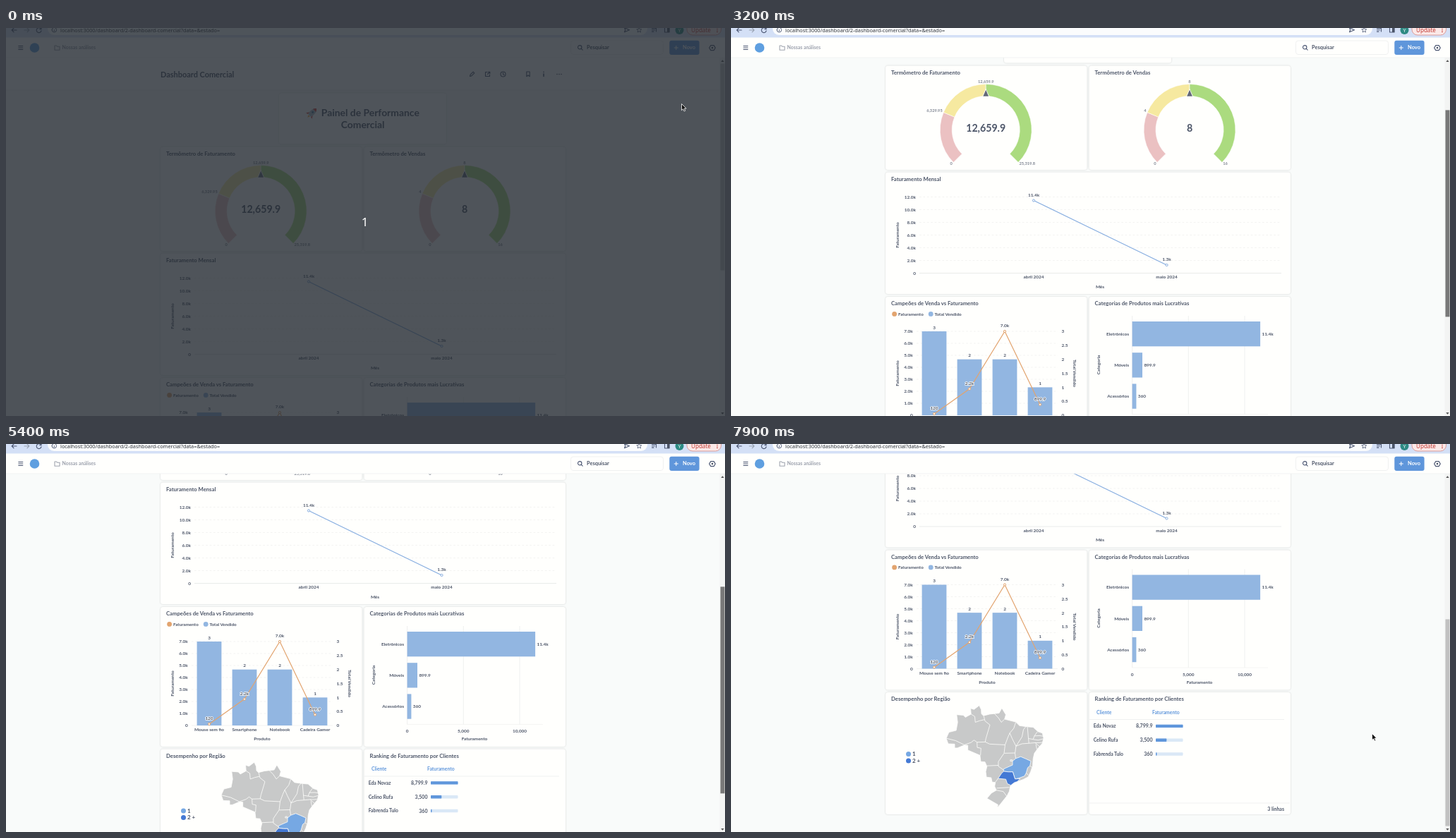
These frames come from a looping animation (1019x550 px, 8 s). An HTML page:

```html
<!DOCTYPE html>
<html lang="pt-BR">
<head>
<meta charset="utf-8">
<title>Dashboard Comercial</title>
<style>
@property --s { syntax: "<number>"; inherits: true; initial-value: 0; }
html, body { margin: 0; width: 100%; height: 100%; overflow: hidden; background: #f9fbfa; }
svg { display: block; width: 1019px; height: 550px; font: 700 6.45px Lato, sans-serif; animation: scroll 8s infinite; }
#board { transform: translateY(calc(var(--s) * -1px)); }
#thumb { transform: translateY(calc(var(--s) * .573px)); animation: thumb 8s step-end infinite; }
#dim { animation: dim 8s step-end infinite; }
#cursor { animation: cursor 8s infinite; }
.card { fill: #fffffd; filter: drop-shadow(0 .5px 1px #0000002a); }
.ui { font-family: "Noto Sans", sans-serif; font-weight: 400; }
.halo { paint-order: stroke; stroke: #fffffd; stroke-width: 1.6px; stroke-linejoin: round; }
.icon { fill: none; stroke: #4c5773; stroke-width: 1.1; stroke-linejoin: round; stroke-linecap: round; }
.map path { vector-effect: non-scaling-stroke; stroke: #fffffd; stroke-width: .8px; stroke-linejoin: round; }

@keyframes scroll {
  0% { --s: 0; }
  26.25% { --s: 0; animation-timing-function: steps(3); }
  30% { --s: 24.5; animation-timing-function: steps(8); }
  40% { --s: 115; animation-timing-function: steps(7); }
  48.75% { --s: 190; animation-timing-function: steps(2); }
  51.25% { --s: 206; }
  52.5% { --s: 206; animation-timing-function: steps(4); }
  57.5% { --s: 228; }
  60% { --s: 228; animation-timing-function: steps(1); }
  61.25% { --s: 232; animation-timing-function: steps(1); }
  63.75% { --s: 238; animation-timing-function: steps(3); }
  67.5% { --s: 265; animation-timing-function: steps(7); }
  76.25% { --s: 331.5; animation-timing-function: steps(2); }
  78.75% { --s: 343; animation-timing-function: steps(1); }
  81.25%, 100% { --s: 345.5; }
}
@keyframes thumb {
  0% { fill: #c1c1c1; }
  15% { fill: #a8a8a8; }
  25% { fill: #787878; }
  88.75% { fill: #a8a8a8; }
  92.5%, 100% { fill: #c1c1c1; }
}
@keyframes dim {
  0% { opacity: 1; }
  2.5%, 100% { opacity: 0; }
}
@keyframes cursor {
  0% { transform: translate(957px, 107px); }
  6.25% { transform: translate(957px, 107px); animation-timing-function: steps(5); }
  12.5% { transform: translate(1017px, 95px); animation-timing-function: steps(1); }
  18.75% { transform: translate(1016px, 95px); }
  26.25% { transform: translate(1016px, 95px); animation-timing-function: steps(3); }
  30% { transform: translate(1016px, 109px); animation-timing-function: steps(5); }
  36.25% { transform: translate(1021px, 136px); animation-timing-function: steps(1); }
  91.25% { transform: translate(1022px, 316px); animation-timing-function: steps(4); }
  96.25% { transform: translate(946px, 379px); animation-timing-function: steps(1); }
  98.75%, 100% { transform: translate(908px, 410px); }
}
</style>
</head>
<body>
<svg id="stage" viewBox="0 0 1019 550"></svg>
<script>
const INK = '#4c5568', BLUE = '#92b6e1', ORANGE = '#e2a46f', BRAND = '#5f96db', GRID = '#eeeeec';
const range = n => [...Array(n).keys()];
const each = (list, fn) => list.map(fn).join('');

// Text placed by the vertical centre of its capitals.
const text = (x, y, s, o = {}) => {
  const { size = 6.45, at = 'middle', fill = INK, cls = '', turn = 0 } = o;
  const spin = turn ? ` transform="rotate(${turn} ${x} ${y})"` : '';
  return `<text x="${x}" y="${y + size * .36}" font-size="${size}px" text-anchor="${at}" fill="${fill}" class="${cls}"${spin}>${s}</text>`;
};
const rect = (x, y, w, h, fill, more = '') => `<rect x="${x}" y="${y}" width="${w}" height="${h}" fill="${fill}" ${more}/>`;
const dot = (x, y, r, fill, more = '') => `<circle cx="${x}" cy="${y}" r="${r}" fill="${fill}" ${more}/>`;
const path = (d, more = '') => `<path d="${d}" ${more}/>`;
const line = (d, color, w = .6, more = '') => path(d, `fill="none" stroke="${color}" stroke-width="${w}" ${more}`);
const icon = (d, more = '') => path(d, `class="icon" ${more}`);
const card = (x, y, w, h, title = '') =>
  `<rect class="card" x="${x}" y="${y}" width="${w}" height="${h}" rx="3.5"/>` + text(x + 8, y + 9.5, title, { size: 7.7, at: 'start' });
const ring = (x, y, color) => dot(x, y, 1.6, '#fffffd', `stroke="${color}" stroke-width="1"`);
const dash = 'stroke-dasharray="2.7 2.7"';

function gauge(cx, labels) {
  const cy = 259.5, R = 65, r = 48;
  const pt = (k, rad) => {
    const a = (135 + 270 * k) * Math.PI / 180;
    return `${(cx + rad * Math.cos(a)).toFixed(2)} ${(cy + rad * Math.sin(a)).toFixed(2)}`;
  };
  const seg = (a, b, fill) => path(
    `M${pt(a, R)}A${R} ${R} 0 0 1 ${pt(b, R)}L${pt(b, r)}A${r} ${r} 0 0 0 ${pt(a, r)}Z`,
    `fill="${fill}" stroke="#fffffd" stroke-width=".6"`);
  const small = (x, y, s, at) => text(x, y, s, { size: 5.7, at, fill: '#7d8390', cls: 'halo' });
  return seg(0, .25, '#ebc1c2') + seg(.25, .5, '#f6e9a0') + seg(.5, 1, '#abdb7f')
    + path(`M${cx} 202.8l3.9 8.9h-7.8z`, 'fill="#626878" stroke="#fffffd" stroke-width="1.6" paint-order="stroke"')
    + small(cx, 190.7, labels[2], 'middle') + small(cx - 61.5, 232, labels[1], 'end')
    + small(cx - 49, 306.7, labels[0], 'middle') + small(cx + 47.3, 306.7, labels[3], 'start')
    + text(cx, 257.3, labels[2], { size: 14.2 });
}

function heading() {
  const rocket = '<g transform="translate(434 120) rotate(45)">'
    + path('M-3 2l-3 4.5 3-.8zM3 2l3 4.5-3-.8z', 'fill="#d8433f"')
    + path('M0-8.5c4 3 4.5 9 2.5 14h-5c-2-5-1.5-11 2.5-14z', 'fill="#a9b8c4"')
    + path('M0-8.5c1.6 1.2 2.5 2.6 3 4.1h-6c.5-1.5 1.4-2.9 3-4.1z', 'fill="#d8433f"')
    + dot(0, -1, 1.5, '#3d6f96') + path('M-1.5 6h3l-1.5 3.5z', 'fill="#f2a53a"') + '</g>';
  return card(387, 92.5, 237, 72) + rocket
    + text(516.3, 120, 'Painel de Performance', { size: 13.9 }) + text(505.7, 137, 'Comercial', { size: 13.9 });
}

function monthly() {
  const pts = [[429, 359.5, '11.4k', 'abril 2024'], [617.5, 451, '1.3k', 'maio 2024']];
  return card(219, 319.5, 574, 172.5, 'Faturamento Mensal')
    + each(range(7), i => {
      const y = 462.5 - 18 * i;
      return line(`M267 ${y}H780`, i ? GRID : '#e0e2e2', .7, i ? dash : '')
        + text(262, y, i ? `${2 * i}.0k` : '0', { at: 'end' });
    })
    + line('M429 359.5L617.5 451', '#86ade0', 1.2)
    + each(pts, ([x, y, v, m]) => ring(x, y, '#86ade0') + text(x, y - 8, v, { cls: 'halo' }) + text(x, 468, m))
    + text(523, 481.3, 'Mês') + text(235.5, 408.5, 'Faturamento', { turn: -90 });
}

function combo() {
  const items = [['Mouse sem fio', 3, 120, '120'], ['Smartphone', 2, 2200, '2.2k'], ['Notebook', 2, 7000, '7.0k'], ['Cadeira Gamer', 1, 899.9, '899.9']];
  const X = i => 288 + 50 * i, Y = v => 664 - v * .017;
  return card(219, 496, 285.5, 198, 'Campeões de Venda vs Faturamento')
    + dot(231.6, 520.4, 3.4, ORANGE) + text(237, 520.4, 'Faturamento', { size: 6.3, at: 'start' })
    + dot(283.2, 520.4, 3.4, BLUE) + text(288.5, 520.4, 'Total Vendido', { size: 6.3, at: 'start' })
    + each(range(8), i => line(`M263 ${664 - 17 * i}H463`, GRID, .7, i ? dash : '')
      + text(257.7, 664 - 17 * i, i ? `${i}.0k` : '0', { at: 'end' }))
    + each(range(7), i => text(468.5, 664 - 19.83 * i, i / 2, { at: 'start' }))
    + each(items, ([name, n], i) => rect(X(i) - 17.4, 664 - 39.67 * n, 34.8, 39.67 * n, BLUE) + text(X(i), 670, name))
    + line('M' + items.map((d, i) => `${X(i)} ${Y(d[2])}`).join('L'), ORANGE, 1.2)
    + each(items, ([, n, v, s], i) => ring(X(i), Y(v), ORANGE)
      + text(X(i), 658.2 - 39.67 * n, n, { cls: 'halo' })
      + text(X(i), Y(v) - 8.2, s, { cls: 'halo' }))
    + text(363, 683, 'Produto') + text(235.5, 604.5, 'Faturamento', { turn: -90 })
    + text(487.5, 604.5, 'Total Vendido', { turn: 90 });
}

function categories() {
  const rows = [['Eletrônicos', 181.5, '11.4k'], ['Móveis', 14.4, '899.9'], ['Acessórios', 5.8, '360']];
  return card(507.5, 496, 285.5, 198, 'Categorias de Produtos mais Lucrativas')
    + each(['0', '5,000', '10,000'], (s, i) => line(`M${568.6 + 79.7 * i} 523V662.5`, '#e8eaea', .7) + text(568.6 + 79.7 * i, 672, s))
    + line('M568.6 662.5H761', GRID)
    + each(rows, ([name, w, v], i) => {
      const y = 531 + 44.2 * i;
      return rect(568.6, y, w, 35.3, BLUE) + text(564, y + 17.6, name, { at: 'end' })
        + text(571 + w, y + 17.6, v, { at: 'start' });
    })
    + text(664, 683, 'Faturamento') + text(521, 592.5, 'Categoria', { turn: -90 });
}

// The map is written in degrees of longitude and latitude.
function region() {
  const land = 'M-74-7.3L-72.9-5-70-4.3-69.4-1.2-69.8 1.7-67.1 1.5-66.3.7-64 1.9-64.2 4.1-62.8 3.7-60.7 5.2-59.9 3.6-59.8 2-59 1.3-56.5 1.9-52.7 2.3-51.6 4.2-50 1.7-50.5 0-48.5-.5-46-1.1-44.5-2.5-41.5-2.9-39-3.1-37-4.8-35.3-5.3-34.8-7.2-35.3-9.2-37.2-11.3-38.5-13-39-15-39.2-17.7-40-20-41-22-43-23-46.5-24.2-48.2-25.5-48.6-27.5-49.5-29.2-52.3-32.5-53.4-33.7-53.2-32.6-57.6-30.2-55.8-28.2-53.8-27.1-54.5-25.6-54.2-24.1-55.5-24-55.9-22.3-57.8-22.1-58.1-20-57.6-18-58.4-16.3-60.1-16.2-60.4-13.8-65.3-11.8-65.3-10-66.7-9.9-69.5-11-70.6-11-70.6-9.5-73.2-9.4Z';
  const north = 'M-74-7.3L-70.2-8.2-66.7-9.8-64-8.9-62.8-8-61.6-8.8-61.5-10.8-60-11.1-60.2-13.8M-61.6-8.8L-58.3-8.7-58-7.3-56.4-2.2-58.4-.7-58.9 1.2M-58.7-.2L-60.5-.6-62.3-1.2-62.5 1-64 1.9M-58.3-8.7L-56.5-9.5-50.3-9.8-49.2-7-48.4-5.3-46.8-3.5-46-1.2M-54.8 2.3L-53 .5-51.8-1.2-50.5 0';
  const east = 'M-48.4-5.3L-47.4-7.5-45.9-10.3-43.5-6.8-42.9-4-41.9-2.8M-41.3-3L-40.9-7.4-40.7-9.2-43.5-9.4-45.9-10.3-46.3-13-46-15M-37.3-4.8L-38.5-6.4-39-7.7-40.9-7.4M-38.5-6.4L-36.5-6.3-35-6.5M-39-7.7L-37-8-34.9-7.5M-40.7-9.2L-38.2-9-36.5-9-35.2-8.9M-38.2-9L-36.4-10.5M-37.9-9.6L-37.5-11.5';
  const south = 'M-50.3-9.8L-50.7-13-53-16.2-53-18-51-19.3M-50.6-13L-46.3-12.9M-57.6-17.8L-53-17.6M-40.3-17.8L-39.6-18.3M-41.8-20.5L-41-21.3M-53.1-22.6L-54.2-24M-53.7-26.3L-48.6-26M-53.8-27.1L-51-27.6-49.7-29.3M-48.2-15.5L-47.4-15.5-47.4-16-48.2-16Z';
  const light = 'M-51-19.1L-50-18.6-47.3-17.5-47.3-16-46-15-44-14.3-42-15.1-39.9-16-40.3-17.8-41.2-18.5-41.8-20.5-42.5-21.7-44.8-22.5-46.3-22.8-47.2-20.1-48.9-20.1-50.8-19.9Z';
  const dark = 'M-53.1-22.6L-51.6-20.5-50.8-19.9-48.9-20.1-47.2-20.1-46.3-22.8-44.2-22.7-45.4-23.8-46.6-24.2-48-25.2-49.4-24.6-50-22.9Z';
  return card(219, 697.5, 285.5, 173, 'Desempenho por Região')
    + dot(251.5, 785, 3.5, '#76a8e3') + text(257, 785, '1', { size: 8, at: 'start' })
    + dot(251.5, 794.5, 3.5, '#4479d4') + text(257, 794.5, '2 +', { size: 8, at: 'start' })
    + '<g class="map" transform="translate(565.5 735.5) scale(3.52 -3.72)">'
    + path(land, 'fill="#c8c9c9"') + each([north, east, south], d => path(d, 'fill="none"'))
    + path(light, 'fill="#76a8e3"') + path(dark, 'fill="#4479d4"') + '</g>';
}

function ranking() {
  const rows = [['Eda Novaz', '8,799.9', 38.5], ['Celino Rufa', '3,500', 15.3], ['Fabrenda Tulo', '360', 1.5]];
  const head = { size: 6.8, at: 'start', fill: BRAND };
  return card(507.5, 697.5, 285.5, 173, 'Ranking de Faturamento por Clientes')
    + text(518, 726, 'Cliente', head) + text(597, 726, 'Faturamento', head)
    + line('M508 736H784', '#e6e8e8') + line('M508 854.5H792', '#e6e8e8')
    + each(rows, ([name, v, w], i) => {
      const y = 745.4 + 19.8 * i;
      return text(513.7, y, name, { size: 6.8, at: 'start' }) + text(597.5, y, v, { size: 7, at: 'end' })
        + rect(602, y - 2.2, 38.5, 4.4, '#dae8f6', 'rx="1"') + rect(602, y - 2.2, w, 4.4, BRAND, 'rx=".7"');
    })
    + text(784, 862.5, '3 linhas', { size: 7, at: 'end' });
}

function titleBar() {
  return rect(0, 40, 1011, 48, '#fffffd') + line('M0 88H1011', '#eceeee', .8)
    + text(219, 66.3, 'Dashboard Comercial', { size: 10.95, at: 'start' })
    + icon('M657.5 68.5l.6-2.3 4-4 1.7 1.7-4 4z')
    + icon('M682 62.5h-2.5v6h6v-2.5M683.5 62.2h2.3v2.3M685.5 62.5l-3 3')
    + icon('M701 65.5a3.5 3.5 0 1 0 7 0a3.5 3.5 0 1 0-7 0M704.5 63.5v2.2l1.5.8')
    + icon('M737.8 62h4.4v6.7l-2.2-1.7-2.2 1.7z')
    + icon('M762 65v3.5M762 62.4v.1', 'style="stroke-width:1.6"')
    + each([781, 784, 787], x => dot(x, 65.5, .8, INK));
}

function browser() {
  return rect(0, 0, 1019, 13.5, '#d4e0f6') + rect(59, -8, 850, 18, '#fbfcfd', 'rx="9"')
    + icon('M15 3H8.3M11 .2L8.2 3l2.8 2.8') + icon('M26 3h6.7M30 .2L32.8 3l-2.8 2.8', 'style="stroke:#98a2b2"')
    + icon('M49.5 1.3a3.4 3.4 0 1 0 .5 2.5M50-.5v2.3h-2.3')
    + icon('M65 2.7a3.3 3.3 0 1 0 6.6 0a3.3 3.3 0 1 0-6.6 0M68.3 2.5v2', 'style="stroke-width:.9"')
    + text(77, 3.4, 'localhost:3000/dashboard/2-dashboard-comercial?data=&amp;estado=', { size: 7.31, at: 'start', fill: '#30343a', cls: 'ui' })
    + icon('M876.5-.3l7 3-7 3 1.2-3z') + icon('M897.3-.8l1 2.4 2.5.2-1.9 1.7.6 2.5-2.2-1.3-2.2 1.3.6-2.5-1.9-1.7 2.5-.2z', 'style="stroke-width:.8"')
    + icon('M915.5.5h6M915.5 2.8h4M915.5 5.1h2.5M921.5.5v4.5')
    + icon('M933.5-1h6.5v7h-6.5z') + rect(937, -1, 3.3, 7, INK)
    + dot(954.5, 3, 6, '#2d8a83') + text(954.5, 3.2, 'Y', { size: 7, fill: '#fff', cls: 'ui' })
    + rect(965, -8, 48.5, 18, '#fbe9e8', 'rx="8" stroke="#d98b86" stroke-width=".8"')
    + text(971, 3, 'Update', { size: 8.1, at: 'start', fill: '#c23a33', cls: 'ui' })
    + each([0, 2.7, 5.4], y => dot(1008, y, .8, '#c23a33'));
}

function header() {
  return rect(0, 0, 1019, 42, '#fffffd') + line('M0 42H1019', '#eceeee', .7) + browser()
    + icon('M17.8 25.5h6M17.8 28h6M17.8 30.5h6')
    + dot(40.5, 28, 6.8, '#5f9fe0')
    + icon('M69 25h2.5l1 1.2h3.5v5h-7z', 'style="stroke:#a0a5b0"')
    + text(79.5, 28, 'Nossas análises', { size: 6.9, at: 'start', fill: '#9a9fab' })
    + rect(800.5, 18, 131, 19.5, '#fffffd', 'rx="3.5" stroke="#eceeee" stroke-width=".8"')
    + icon('M810.5 27.3a2.7 2.7 0 1 0 5.4 0a2.7 2.7 0 1 0-5.4 0M815.3 29.3l1.9 1.9')
    + text(823, 27.5, 'Pesquisar', { size: 7.45, at: 'start' })
    + rect(940.3, 17.7, 42.3, 20.3, BRAND, 'rx="3"') + line('M946.8 28h6M949.8 25v6', '#fff', 1)
    + text(959, 27.5, 'Novo', { size: 7.5, at: 'start', fill: '#fff' })
    + icon('M998.8 24.6h4.4l2.1 3.5-2.1 3.5h-4.4l-2.1-3.5z') + dot(1001, 28.1, 1.3, INK);
}

document.getElementById('stage').innerHTML =
  rect(0, 0, 1019, 550, '#f9fbfa')
  + '<g id="board">' + titleBar() + heading()
  + card(219, 168.5, 285.5, 147.5, 'Termômetro de Faturamento') + gauge(361.2, ['0', '6,329.95', '12,659.9', '25,319.8'])
  + card(507.5, 168.5, 285.5, 147.5, 'Termômetro de Vendas') + gauge(650, ['0', '4', '8', '16'])
  + monthly() + combo() + categories() + region() + ranking() + '</g>'
  + rect(1011.5, 42, 7.5, 508, '#f3f4f3') + header()
  + path('M1013.3 48l2.2-2.8 2.2 2.8zM1013.3 545l2.2 2.8 2.2-2.8z', 'fill="#555"')
  + rect(1012.5, 50.5, 6, 293, '#c1c1c1', 'id="thumb"')
  + '<g id="dim">' + rect(0, 0, 1019, 550, '#242a31', 'opacity=".8"') + text(508.7, 275.3, '1', { size: 17, fill: '#fff', cls: 'ui' }) + '</g>'
  + '<g id="cursor">' + path('M.5.5v9.2l2.1-1.9 1.5 3.2 1.6-.7-1.5-3.2h2.9z', 'fill="#111" stroke="#fff" stroke-width=".8" stroke-linejoin="round"') + '</g>';
</script>
</body>
</html>
```
